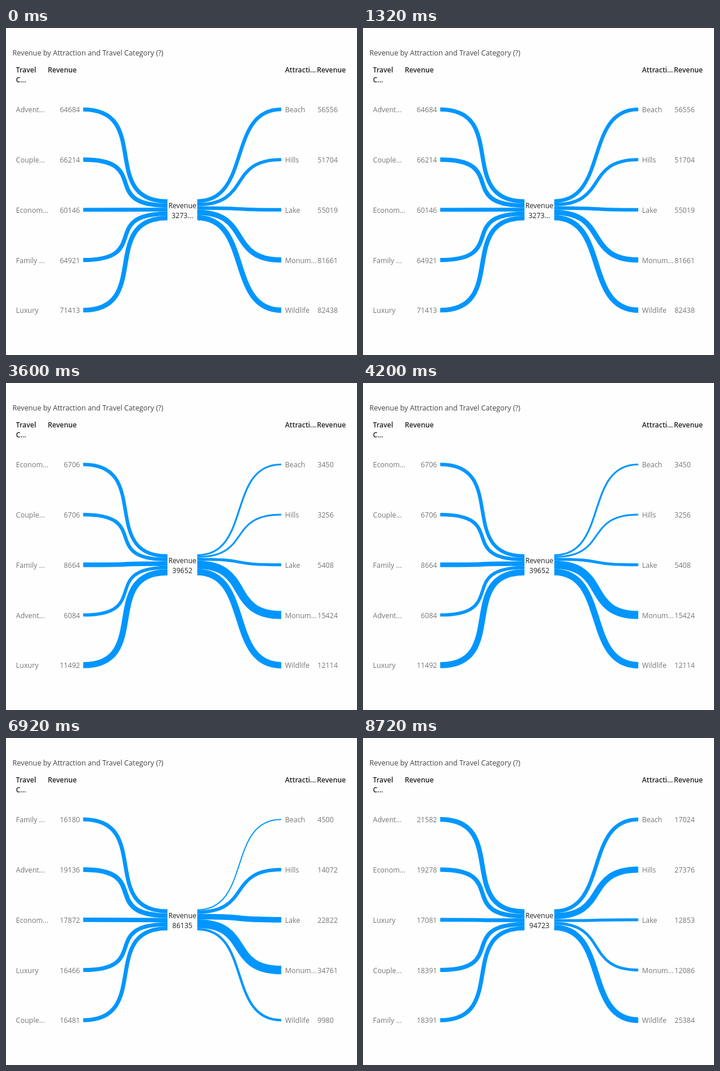
An HTML page that plays this animation: 600x559 px, repeating every 9960 ms.

```html
<!DOCTYPE html>
<html lang="en">
<head>
<meta charset="utf-8">
<title>Revenue by Attraction and Travel Category</title>
<style>
  html, body { margin: 0; width: 100%; height: 100%; overflow: hidden; background: #fefefe; }
  svg { display: block; width: 600px; height: 559px; font: 12.1px "Open Sans", "Noto Sans", sans-serif; }
  .title { fill: #444; font-size: 12.3px; }
  .head { fill: #222; font-weight: 600; font-size: 11.9px; }
  .row { fill: #777; }
  .total { fill: #222; font-size: 12px; text-anchor: middle; }
  .end { text-anchor: end; }
  path { fill: none; stroke: #0096ff; }
</style>
</head>
<body>
<svg viewBox="0 0 600 559">
  <text class="title" x="11" y="47">Revenue by Attraction and Travel Category (?)</text>
  <g class="head">
    <text x="17" y="76">Travel</text>
    <text x="17" y="93">C...</text>
    <text x="71.5" y="76">Revenue</text>
    <text x="477" y="76">Attracti...</text>
    <text x="531.5" y="76">Revenue</text>
  </g>
  <g id="chart"></g>
  <text class="total" x="301.5" y="308">Revenue</text>
  <text class="total" id="total" x="301.5" y="325"></text>
</svg>
<script>
const LOOP = 9960;
const MID = 310.8, SPAN = 429, STACK = 36;
const NAMES = {
  A: 'Advent...', C: 'Couple...', E: 'Econom...', F: 'Family ...', X: 'Luxury',
  B: 'Beach', H: 'Hills', L: 'Lake', M: 'Monum...', W: 'Wildlife'
};

// Each view: start time, total, then key letters and values for both sides
const VIEWS = [
  { at: 0, total: '3273...',
    left: ['ACEFX', 64684, 66214, 60146, 64921, 71413],
    right: ['BHLMW', 56556, 51704, 55019, 81661, 82438] },
  { at: 1720, total: '41896',
    left: ['AEXCF', 6208, 8040, 12908, 6520, 8220],
    right: ['LMW', 13936, 14740, 13220] },
  { at: 3600, total: '39652',
    left: ['ECFAX', 6706, 6706, 8664, 6084, 11492],
    right: ['BHLMW', 3450, 3256, 5408, 15424, 12114] },
  { at: 5400, total: '64972',
    left: ['ACFXE', 11674, 18116, 13466, 13466, 8250],
    right: ['BHMW', 31582, 7000, 4650, 21740] },
  { at: 6920, total: '86135',
    left: ['FAEXC', 16180, 19136, 17872, 16466, 16481],
    right: ['BHLMW', 4500, 14072, 22822, 34761, 9980] },
  { at: 8600, total: '94723',
    left: ['AEXCF', 21582, 19278, 17081, 18391, 18391],
    right: ['BHLMW', 17024, 27376, 12853, 12086, 25384] }
];

const SIDES = {
  left: { outer: 132, inner: 276, bend: 0.82, name: 17, value: 126.5, cls: 'row end' },
  right: { outer: 470.5, inner: 327, bend: 0.65, name: 477, value: 532.5, cls: 'row' }
};

const text = (x, y, s, cls) => `<text class="${cls}" x="${x}" y="${y.toFixed(1)}">${s}</text>`;

function ribbon({ outer, inner, bend }, y0, y1, width) {
  const d = (inner - outer) * bend;
  return `<path d="M${outer},${y0}C${outer + d},${y0} ${inner - d},${y1} ${inner},${y1}" stroke-width="${width}"/>`;
}

function drawSide(side, [keys, ...values]) {
  const sum = values.reduce((a, b) => a + b, 0);
  const n = values.length;
  let top = MID - STACK / 2;
  return values.map((value, i) => {
    const y = MID + (i - (n - 1) / 2) * SPAN / n;
    const width = value / sum * STACK;
    const innerY = top + width / 2;
    top += width;
    return ribbon(side, y, innerY, width) +
      text(side.name, y + 5, NAMES[keys[i]], 'row') +
      text(side.value, y + 5, value, side.cls);
  }).join('');
}

const chart = document.getElementById('chart');
const total = document.getElementById('total');
const start = performance.now();
let shown = null;

function render(ms) {
  const view = VIEWS.filter(v => v.at <= ms).pop();
  if (view === shown) return;
  shown = view;
  chart.innerHTML = drawSide(SIDES.left, view.left) + drawSide(SIDES.right, view.right);
  total.textContent = view.total;
}

function tick() {
  render((performance.now() - start) % LOOP);
  requestAnimationFrame(tick);
}
tick();
</script>
</body>
</html>
```
